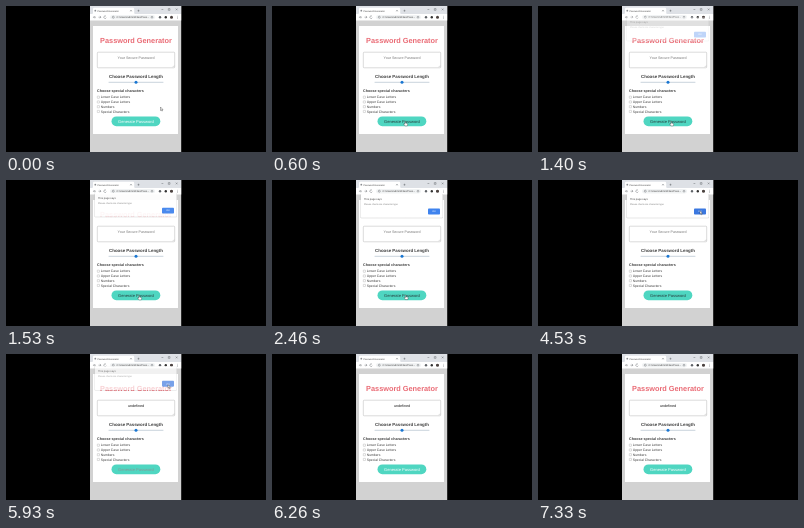
These frames come from a looping animation (260x146 px, 7400 ms). An HTML page:

```html
<!DOCTYPE html>
<html lang="en">
<head>
<meta charset="utf-8">
<title>Password Generator</title>
<style>
  html, body { margin: 0; width: 100%; height: 100%; overflow: hidden; background: #000; }
  svg { display: block; width: 100vw; height: 100vh; }
  text { font-family: "Liberation Sans", Arial, sans-serif; fill: #3c3c3c; text-rendering: geometricPrecision; }
  .mid { text-anchor: middle; }
  .bold { font-weight: bold; }
  .icon { fill: none; stroke: #5f6368; stroke-width: .45; }
</style>
</head>
<body>
<svg viewBox="0 0 260 146">
  <rect width="260" height="146" fill="#000"/>

  <!-- browser bars -->
  <rect x="84" width="91.200" height="146" fill="#d2d2d2"/>
  <rect x="84" width="91.200" height="8" fill="#dee1e6"/>
  <path d="M86 8q1 0 1-1V3q0-1.200 1.200-1.200H127q1.200 0 1.200 1.200V7q0 1 1 1z" fill="#fff"/>
  <circle cx="89.300" cy="4.700" r=".9" fill="#8a8d91"/>
  <text x="91.500" y="5.600" font-size="2.350">Password Generator</text>
  <path class="icon" d="M124.300 4l1.400 1.400m0-1.400l-1.400 1.400M131.500 4.700h2m-1-1v2M155.500 3.500h1.800M162.300 2.600h1.700v1.700h-1.700zM169.800 2.600l1.700 1.700m0-1.700l-1.700 1.700"/>
  <rect x="84" y="8" width="91.200" height="6.500" fill="#fff"/>
  <path class="icon" d="M90 11.200h-2.500l1.100-1.100m-1.100 1.100l1.100 1.100M92.500 11.200H95l-1.100-1.100m1.100 1.100l-1.100 1.100M100 10.200a1.300 1.300 0 1 0 .3 1.500"/>
  <rect x="104" y="8.900" width="45" height="4.700" rx="2.350" fill="#f1f3f4"/>
  <circle class="icon" cx="107.300" cy="11.200" r="1"/>
  <text x="110.500" y="12.100" font-size="2.600">C:/Users/admin/Files/Pass...</text>
  <circle class="icon" cx="146" cy="11.200" r=".9"/>
  <circle cx="154" cy="11.200" r="1.200" fill="#5f6368"/>
  <circle cx="159.800" cy="11.200" r="1.200" fill="#333"/>
  <circle cx="165.500" cy="11.200" r="1.500" fill="#4c4340"/>
  <path d="M171.500 9.900v.5m0 .6v.5m0 .6v.5" stroke="#5f6368" stroke-width=".6"/>

  <!-- page -->
  <rect x="87" y="20" width="85" height="108" fill="#fff"/>
  <text class="mid bold" x="130" y="37.200" font-size="7.350" style="fill:#ea6b75">Password Generator</text>
  <rect x="91.300" y="46.200" width="77.400" height="15.600" rx=".8" fill="#fff" stroke="#b5b5b5" stroke-width=".5"/>
  <path d="M166.600 61.100l1.500-1.500m-.6 1.500l.6-.6" stroke="#777" stroke-width=".25"/>
  <text id="field" class="mid" x="130" y="52.500" font-size="3.650"></text>
  <text class="mid bold" x="130" y="72" font-size="4.400">Choose Password Length</text>
  <path d="M103 76.300h54" stroke="#c3ced8" stroke-width=".9" stroke-linecap="round"/>
  <circle cx="130" cy="76.300" r="1.500" fill="#1976d2"/>
  <text class="bold" x="91" y="86.400" font-size="3.700">Choose special characters</text>
  <g id="options"></g>
  <rect x="105.500" y="110.400" width="48.800" height="9.800" rx="4.900" fill="#4fd6c1"/>
  <text id="label" class="mid" x="130" y="116.600" font-size="4.050">Generate Password</text>

  <g id="dialog">
    <rect x="88.500" y="14.300" width="82.500" height="24" rx=".8" fill="#777" opacity=".35"/>
    <rect x="88.800" y="14" width="81.900" height="23.800" rx=".7" fill="#fff"/>
    <text x="92" y="19.900" font-size="2.650">This page says</text>
    <text x="92" y="24.800" font-size="2.350" style="fill:#777">Please check one character type</text>
    <rect id="ok" x="156" y="28.600" width="12" height="5.900" rx=".8"/>
    <text class="mid" x="162" y="32.400" font-size="2.400" style="fill:#fff">OK</text>
  </g>

  <g id="cursor" stroke="#222" stroke-width=".35" fill="#fff" stroke-linejoin="round">
    <path id="arrow" d="M0 0v3.500l.8-.7.6 1.300.6-.3-.6-1.200h1.100z"/>
    <path id="hand" d="M-.4 0q.4-.4.8 0v1.500l1.700.4q.5.200.4.8l-.4 1.600H-.3L-1.500 2.600q0-.6.5-.5l.6.500z"/>
  </g>
</svg>
<script>
const LOOP = 7400, STEP = 1000 / 15;
const $ = id => document.getElementById(id);

$("options").innerHTML = ["Lower Case Letters", "Upper Case Letters", "Numbers", "Special Characters"]
  .map((name, i) => {
    const y = 91.2 + i * 4.75;
    return `<rect x="91.300" y="${y - 1.1}" width="2.200" height="2.200" rx=".3" fill="#fff" stroke="#888" stroke-width=".3"/>
      <text x="94.700" y="${y + 1.2}" font-size="3.400">${name}</text>`;
  }).join("");

// Rows: time, then values
const pointer = [
  [60, 154.5, 101], [530, 133.2, 115.6], [2130, 133.2, 115.6], [2460, 133.7, 115.3],
  [3060, 133.7, 115.3], [3530, 161, 31], [4000, 161, 31], [4530, 162, 30.7]
];
const dialogPose = [
  [1330, 0, -4], [1530, .94, -1], [1600, 1, 0],
  [5730, 1, 0], [5930, .7, -1.8], [6130, 0, -4]
];
const labelMix = [[330, 0], [600, 1], [5800, 1], [5930, .55], [6200, 0]];

const smooth = p => p * p * (3 - 2 * p);

function at(rows, t, ease = p => p) {
  const i = rows.findIndex(r => r[0] > t);
  if (i < 0) return rows[rows.length - 1].slice(1);
  if (i === 0) return rows[0].slice(1);
  const a = rows[i - 1], b = rows[i];
  const p = ease((t - a[0]) / (b[0] - a[0]));
  return a.slice(1).map((v, k) => v + (b[k + 1] - v) * p);
}

const blend = (a, b, p) => `rgb(${a.map((v, i) => Math.round(v + (b[i] - v) * p))})`;

function draw(t) {
  const [x, y] = at(pointer, t, smooth);
  const [alpha, dy] = at(dialogPose, t);
  const [dark] = at(labelMix, t);
  const onButton = y > 110 && x < 154;

  $("cursor").setAttribute("transform", `translate(${x} ${y})`);
  $("cursor").style.opacity = t < 6060 ? 1 : 0;
  $("hand").style.opacity = onButton ? 1 : 0;
  $("arrow").style.opacity = onButton ? 0 : 1;

  $("dialog").setAttribute("transform", `translate(0 ${dy})`);
  $("dialog").style.opacity = alpha;
  $("ok").style.fill = t > 3460 ? "#3b78e0" : "#3f83ee";
  $("label").style.fill = blend([255, 255, 255], [38, 58, 58], dark);

  const done = t >= 5800;
  $("field").textContent = done ? "undefined" : "Your Secure Password";
  $("field").style.fill = done ? "#111" : "#777";
}

const start = performance.now();
function tick() {
  const t = (performance.now() - start) % LOOP;
  draw(Math.floor(t / STEP + .12) * STEP);
  requestAnimationFrame(tick);
}
tick();
</script>
</body>
</html>
```
